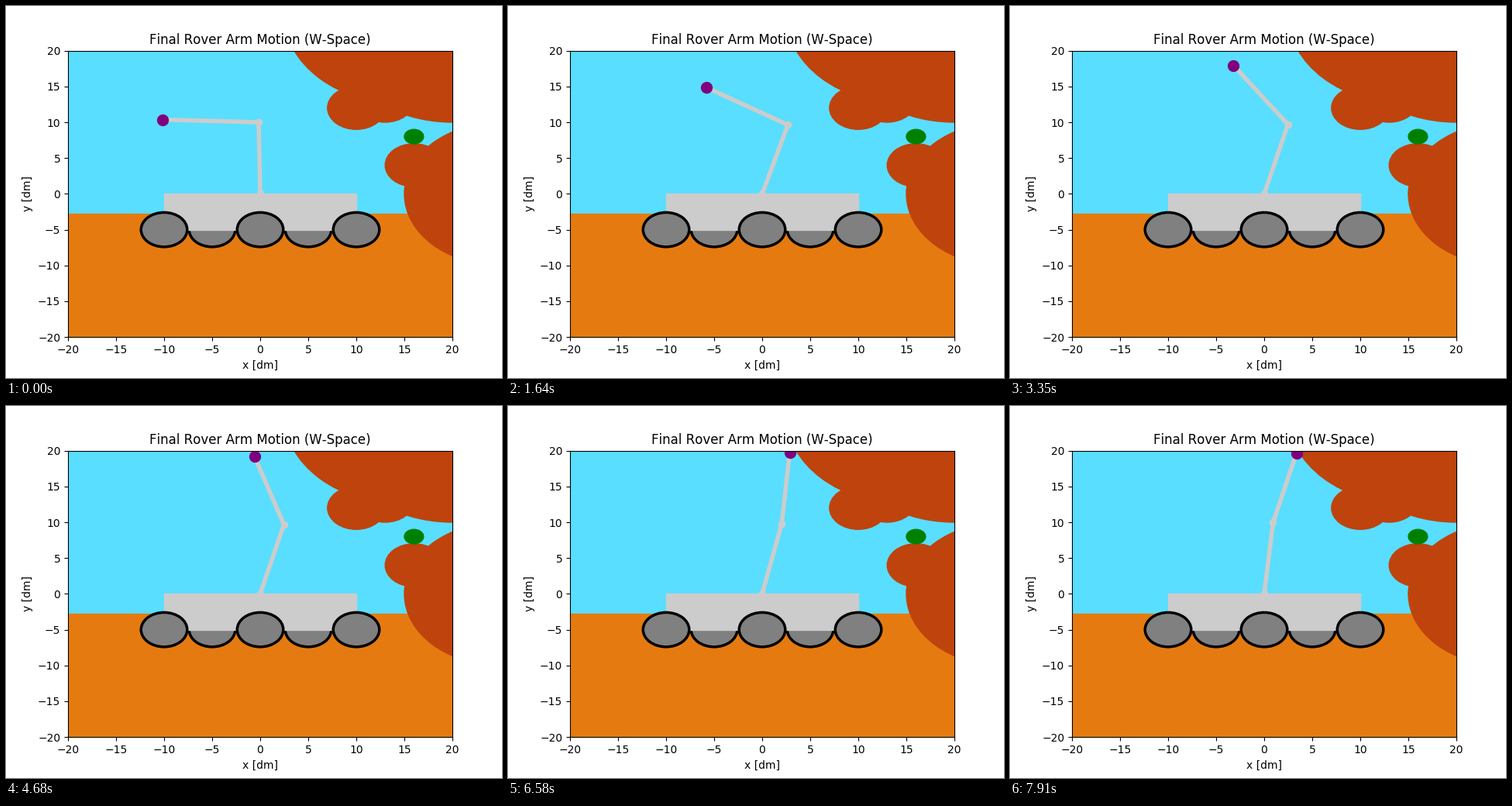
Recreate the animation shown at these times as a matplotlib script. Size 640x480 px, loop 8 s.

```python
import numpy as np
import matplotlib.pyplot as plt
from matplotlib.animation import FuncAnimation
from matplotlib.patches import Circle, Rectangle

LOOP, TICK = 8000, 20
SKY, SOIL, ROCK = "#59deff", "#e57b10", "#bf430d"
METAL = "0.8"
LINK = 10

# Joint angles in degrees (shoulder, elbow) at the path's turning poses
TURNS = {
    0: (90.9, 87.0),
    18: (74.5, 73.9),
    36: (75.7, 48.8),
    40: (79.0, 43.8),
    50: (75.7, 32.2),
    58: (71.8, 22.0),
    70: (78.3, 6.9),
    84: (84.7, -8.8),
}
POSES = list(TURNS)
SHOULDER, ELBOW = np.radians(list(TURNS.values())).T

plt.rcParams["text.kerning_factor"] = 6
fig, ax = plt.subplots(figsize=(6.4, 4.8), dpi=100)
ax.set(xlim=(-20, 20), ylim=(-20, 20), xlabel="x [dm]", ylabel="y [dm]",
       title="Final Rover Arm Motion (W-Space)", facecolor=SKY)


def disc(x, y, r, color):
    ax.add_patch(Circle((x, y), r, color=color))


def box(x, y, w, h, color):
    ax.add_patch(Rectangle((x, y), w, h, color=color))


def wheels(*xs):
    for x in xs:
        ax.add_patch(Circle((x, -5), 2.4, facecolor="gray",
                            edgecolor="black", linewidth=2.5))


# Landscape
box(-20, -20, 40, 17.25, SOIL)
for x, y, r in [(15, 25, 12.5), (20, 22, 12), (10, 12, 3), (13, 13, 3),
                (25, 0, 10), (16, 4, 3)]:
    disc(x, y, r, ROCK)
disc(16, 8, 1, "green")

# Rover
wheels(-5, 5)
box(-10, -5, 20, 5, METAL)
wheels(-10, 0, 10)
arm, = ax.plot([], [], "-o", color=METAL, linewidth=4, markersize=6)
hand, = ax.plot([], [], "o", color="purple", markersize=10)


def pose_at(ms):
    """Poses alternate between 130 ms and 60 ms on screen."""
    pairs, rest = divmod(ms + 70, 190)
    return 2 * pairs + (rest >= 130)


def draw(frame):
    pose = pose_at(frame * TICK + TICK // 2)
    shoulder = np.interp(pose, POSES, SHOULDER)
    elbow = np.interp(pose, POSES, ELBOW)
    angles = np.array([shoulder, shoulder + elbow])
    xs = np.append(0, np.cumsum(LINK * np.cos(angles)))
    ys = np.append(0, np.cumsum(LINK * np.sin(angles)))
    arm.set_data(xs, ys)
    hand.set_data(xs[-1:], ys[-1:])
    return arm, hand


anim = FuncAnimation(fig, draw, frames=LOOP // TICK, interval=TICK,
                     repeat=True, repeat_delay=0, blit=True)
plt.show()
```
